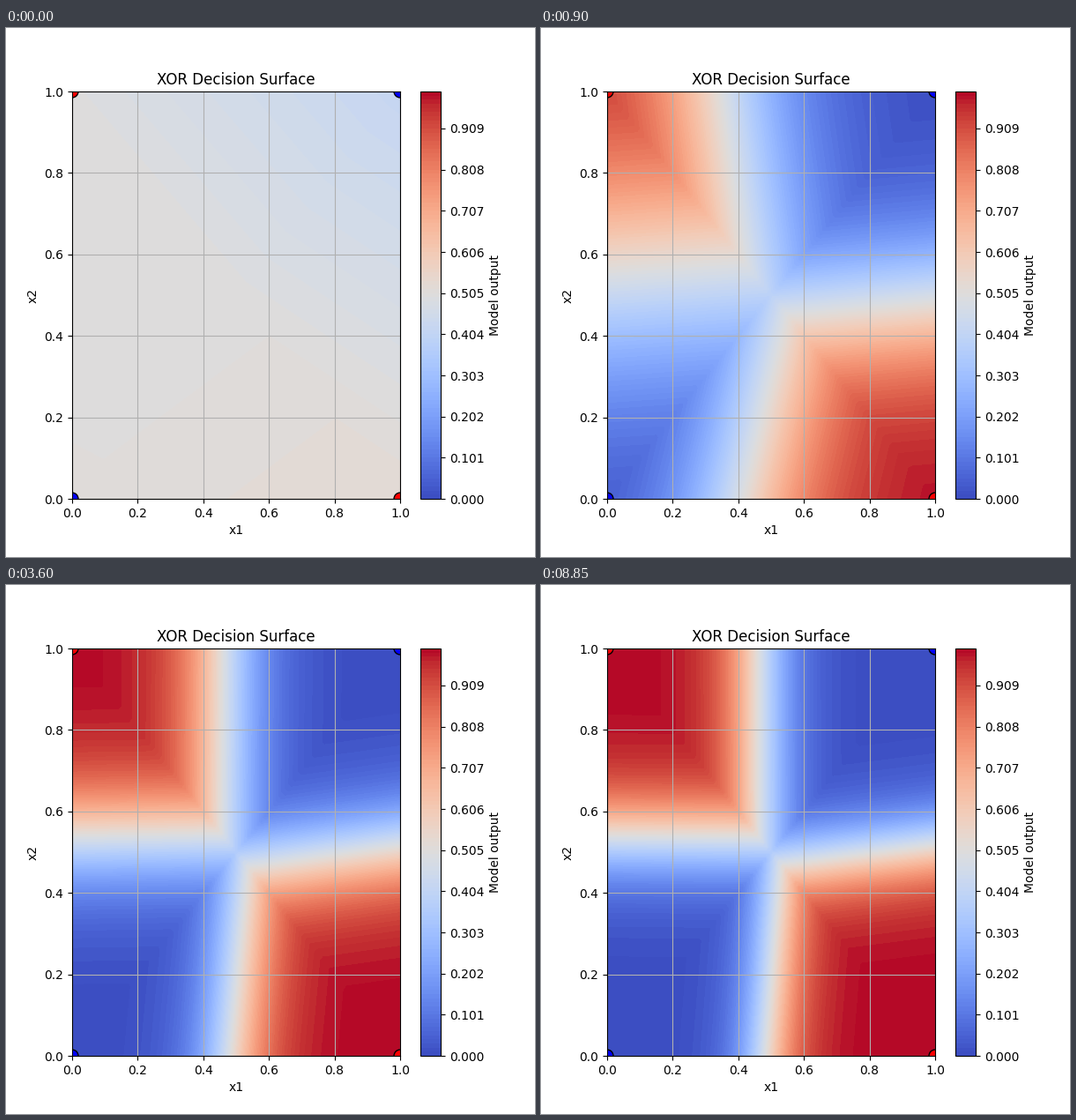
Animation, 600 px wide and 600 px high, one loop 9000 ms. Source, as a matplotlib script:

```python
import numpy as np
import matplotlib.pyplot as plt
from matplotlib.animation import FuncAnimation

FRAMES, INTERVAL = 60, 150
LAST = FRAMES - 1
LEVELS = np.linspace(0, 1, 100)


def sigmoid(z):
    return 1 / (1 + np.exp(-z))


def learn(step, start, gain, onset):
    """Logit that switches on around the onset step, then grows like a log."""
    growth = np.log(1 + 2 * step) / np.log(1 + 2 * LAST)
    return start + gain * growth * sigmoid(step - onset)


axis = np.linspace(0, 1, 100)
X, Y = np.meshgrid(axis, axis)
DX, DY = X - 0.5, Y - 0.5
RADIUS = 2 * np.maximum(abs(DX), abs(DY))
# Each grid point pushed out from the centre to the unit square's border
EX, EY = 0.5 + DX / RADIUS, 0.5 + DY / RADIUS


def surface(step):
    """Sigmoid of four linear facets that meet along the diagonals."""
    bl = learn(step, start=0.025, gain=-8.4, onset=5.3)
    br = learn(step, start=0.1, gain=8.8, onset=4.1)
    tl = learn(step, start=-0.01, gain=7.1, onset=5.5)
    tr = learn(step, start=-0.33, gain=-8.0, onset=2.5)
    centre = -0.6 * (1 - np.exp(-step / 4))

    edge = (1 - EY) * (bl + (br - bl) * EX) + EY * (tl + (tr - tl) * EX)
    return sigmoid(centre + RADIUS * (edge - centre))


fig, ax = plt.subplots(figsize=(6, 6), dpi=100)


def draw_surface(step):
    return ax.contourf(X, Y, surface(step), levels=LEVELS, cmap="coolwarm")


contour = draw_surface(0)
fig.colorbar(contour, ax=ax, label="Model output")
ax.scatter([0, 0, 1, 1], [0, 1, 0, 1], c=["blue", "red", "red", "blue"],
           s=100, edgecolors="black", zorder=1.2)
ax.set(xlim=(0, 1), ylim=(0, 1), xlabel="x1", ylabel="x2",
       title="XOR Decision Surface")
ax.grid(True)


def update(step):
    global contour
    contour.remove()
    contour = draw_surface(step)
    return [contour]


anim = FuncAnimation(fig, update, frames=FRAMES, interval=INTERVAL,
                     init_func=lambda: [], repeat=True, repeat_delay=0)
plt.show()
```
